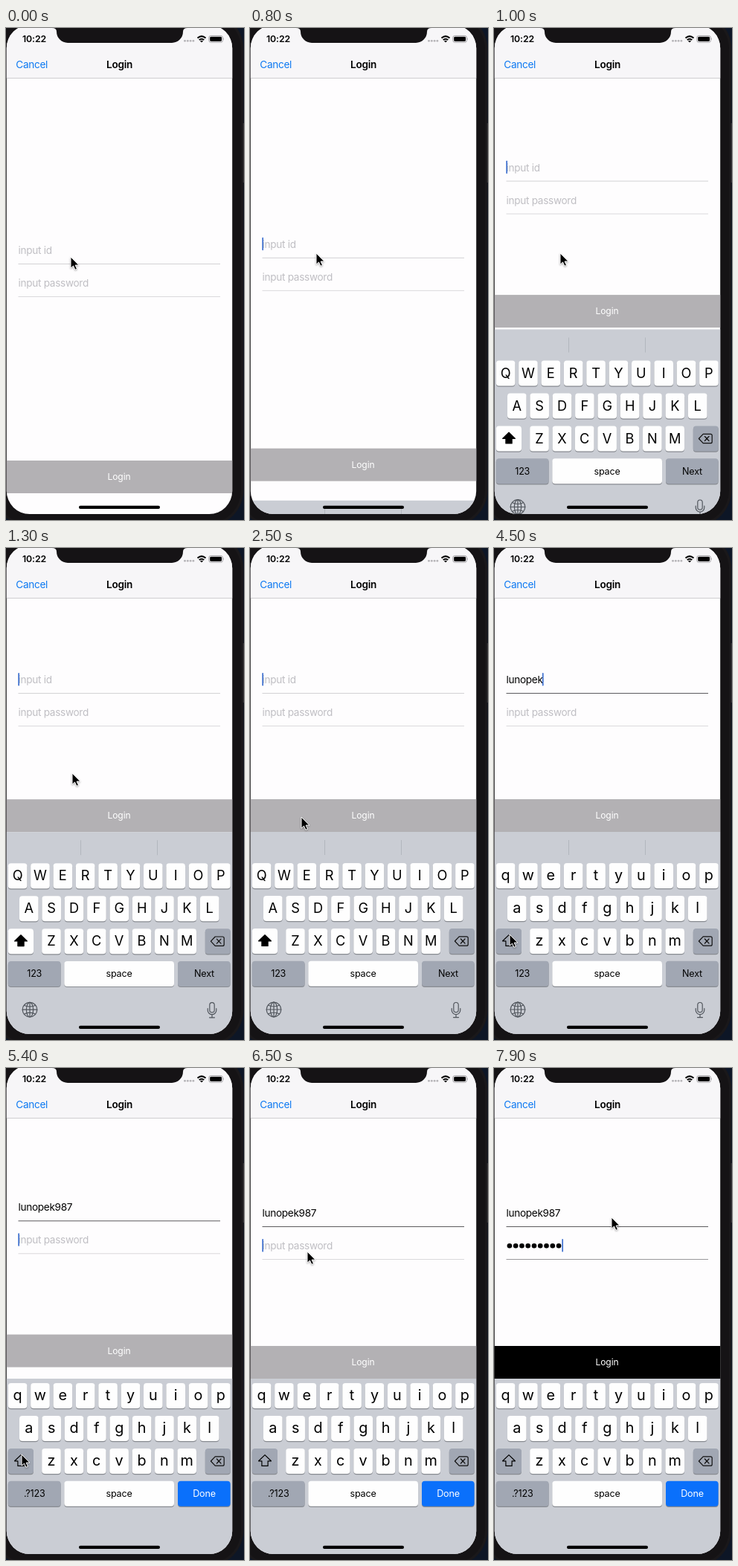
Write an HTML page that moves like this. It is 320 px wide and 662 px high and loops after 8 s.

```html
<!DOCTYPE html>
<html lang="en">
<head>
<meta charset="utf-8">
<title>Login form</title>
<style>
  html, body { margin: 0; width: 100%; height: 100%; overflow: hidden; background: #111; }
  svg { display: block; width: 320px; height: 662px; }
  text { font-family: Inter, Roboto, sans-serif; font-size: 13.6px; letter-spacing: -.3px; white-space: pre; }
  .mid { text-anchor: middle; }
  .key { letter-spacing: 0; text-anchor: middle; }
  .label { font-size: 12.6px; letter-spacing: -.2px; text-anchor: middle; }
  .hint { fill: #bfbec3; }
  .icon { fill: none; stroke: #50555c; stroke-width: 1.2; stroke-linecap: round; stroke-linejoin: round; }
</style>
</head>
<body>
<svg viewBox="0 0 320 662" xmlns="http://www.w3.org/2000/svg">
  <defs>
    <clipPath id="glass"><rect x=".8" y="-4" width="303.4" height="658" rx="31"/></clipPath>
  </defs>
  <rect width="320" height="662" fill="#0d1626"/>
  <rect x="-17" y="-20" width="336.4" height="690" rx="48" fill="#1a181a"/>
  <rect x="-14" y="-17" width="330" height="684" rx="45" fill="#151315"/>
  <rect x="318.6" y="128" width="2" height="80" fill="#343236"/>

  <g clip-path="url(#glass)">
    <rect width="320" height="662" fill="#fefdfe"/>

    <g id="fields">
      <text id="idHint" class="hint" x="16.5" y="5">input id</text>
      <text id="idText" x="16.5" y="5"></text>
      <rect id="idLine" x="16.5" y="18" width="271.5" height="1"/>
      <text id="pwHint" class="hint" x="16.5" y="49">input password</text>
      <g id="dots"></g>
      <rect id="pwLine" x="16.5" y="62" width="271.5" height="1"/>
      <rect id="caret" y="-9" width="1.7" height="17.5" rx=".8" fill="#3e70cf"/>
    </g>

    <g id="login">
      <rect id="loginBox" width="320" height="44"/>
      <text class="mid" x="152" y="26.3" fill="#fff" style="font-size:12.1px;letter-spacing:-.15px">Login</text>
    </g>

    <g id="board">
      <rect id="boardBg" width="320" fill="#cacdd4"/>
      <g id="bar">
        <path d="M100.5 393v20M203.5 393v20" stroke="#b2b6bd"/>
        <g class="icon">
          <circle cx="32" cy="621" r="9.8"/>
          <ellipse cx="32" cy="621" rx="4.6" ry="9.8"/>
          <path d="M32 611.2v19.6M22.2 621h19.6M24.3 615q7.7 4 15.4 0M24.3 627q7.7-4 15.4 0"/>
          <rect x="273.8" y="611.5" width="6.4" height="13.2" rx="3.2"/>
          <path d="M271.2 619.5v2.2a5.8 5.8 0 0 0 11.6 0v-2.2M277 627.6v4M273.5 631.6h7"/>
        </g>
      </g>
      <g id="keys"></g>
      <path id="arrow" d="M20 520.6l8.4 8.2h-4.3v6.6h-8.2v-6.6h-4.3z" stroke="#000" stroke-width="1.2" stroke-linejoin="round"/>
      <path class="icon" style="stroke:#111" d="M281.2 522.8h10a2 2 0 0 1 2 2v8.4a2 2 0 0 1-2 2h-10l-5.8-6.2zM283.4 526l5.6 6M289 526l-5.6 6"/>
    </g>

    <rect width="320" height="67" fill="#f7f6f8"/>
    <rect y="67" width="320" height="1" fill="#cfced1"/>
    <text x="13.3" y="54.3" fill="#0d79f2">Cancel</text>
    <text class="mid" x="152.5" y="54.3" font-weight="600">Login</text>
    <text x="22" y="19.3" font-weight="600" style="font-size:12.3px;letter-spacing:-.1px">10:22</text>
    <g fill="#b4b3b6">
      <circle cx="240.5" cy="17.3" r="1.4"/><circle cx="244.3" cy="17.3" r="1.4"/>
      <circle cx="248.1" cy="17.3" r="1.4"/><circle cx="251.9" cy="17.3" r="1.4"/>
    </g>
    <g fill="none" stroke="#000" stroke-width="2">
      <path d="M257.5 13.4q5.5-4.6 11 0M259.7 16q3.3-2.6 6.6 0"/>
    </g>
    <path d="M260.9 17.4q2.1-1.5 4.2 0l-2.1 2.1z"/>
    <rect x="272.8" y="10.4" width="18.6" height="8.9" rx="2.6" fill="none" stroke="#99989b" stroke-width=".9"/>
    <rect x="274.2" y="11.8" width="15.8" height="6.1" rx="1.4"/>
    <path d="M292.4 13.3q1.4 1.5 0 3z" fill="#99989b"/>
    <path d="M62-4h182v4q-6 0-6 5a15 15 0 0 1-15 15H83a15 15 0 0 1-15-15q0-5-6-5z" fill="#151315"/>
    <rect x="98" y="642.8" width="109" height="4.1" rx="2"/>
  </g>

  <path id="mouse" d="M0 0v15.2l3.5-3.2 2.4 5.3 2.6-1.1-2.4-5.1h4.8z" stroke="#fff" stroke-width="1" stroke-linejoin="round" style="filter:drop-shadow(0 1px 1px #0005)"/>
</svg>
<script>
const LOOP = 8000, ID_FOCUS = 778, LOWER = 3150, PW_FOCUS = 5296;
const USER = "lunopek987";
const idTimes = [3690, 3800, 3920, 4040, 4170, 4310, 4450, 4880, 4980, 5080];
const pwTimes = Array.from({ length: 9 }, (_, i) => 6690 + i * 100);
const mousePath = [
  [0, 87, 308], [100, 89, 303], [1850, 89, 303], [2300, 70, 357], [2400, 70, 357],
  [2500, 69, 362], [3050, 21, 520], [5600, 21, 520], [6480, 77, 247],
  [6700, 77, 247], [7700, 158, 201]
];

const $ = id => document.getElementById(id);
const set = (el, attrs) => { for (const k in attrs) el.setAttribute(k, attrs[k]); };
function add(parent, tag, attrs, text) {
  const el = document.createElementNS("http://www.w3.org/2000/svg", tag);
  set(el, attrs);
  if (text) el.textContent = text;
  parent.append(el);
  return el;
}

const GREY = "#a1a7b3", WHITE = "#fefefe";
function addKey(x, y, w, fill) {
  add($("keys"), "rect", { x, y: y + 1, width: w, height: 34.2, rx: 4, fill: "#888b91" });
  return add($("keys"), "rect", { x, y, width: w, height: 34, rx: 4, fill });
}

const letters = [];
[["qwertyuiop", 15.6], ["asdfghjkl", 30.8], ["zxcvbnm", 61]].forEach(([row, x0], r) => {
  [...row].forEach((ch, i) => {
    const x = x0 + i * 30.37, y = 424 + r * 44;
    addKey(x - 12.8, y, 25.6, WHITE);
    letters.push({ ch, el: add($("keys"), "text", { class: "key", x, y: y + 23.2 }) });
  });
});
const shiftKey = addKey(2.8, 512, 34.2, GREY);
addKey(267.8, 512, 34, GREY);
addKey(2.8, 555.7, 70.8, GREY);
addKey(78.3, 555.7, 147.7, WHITE);
const goKey = addKey(231, 555.7, 70.6, GREY);
const label = (x, text) => add($("keys"), "text", { class: "label", x, y: 577 }, text);
const modeText = label(38.2, "123");
const goText = label(266.5, "Next");
label(152, "space");

const dots = pwTimes.map((_, i) => add($("dots"), "circle", { cx: 20.9 + i * 8.27, cy: 44.3, r: 3.3 }));

const settle = ms => ms <= 0 ? 0 : 1 - Math.exp(-ms * .01826) * (1 + ms * .01826);
const show = (el, on) => { el.style.display = on ? "" : "none"; };
const count = (times, t) => times.filter(v => v <= t).length;

function mouseAt(t) {
  let i = mousePath.findIndex(p => p[0] > t);
  if (i < 0) return mousePath[mousePath.length - 1].slice(1);
  const a = mousePath[i - 1], b = mousePath[i];
  const u = (t - a[0]) / (b[0] - a[0]), s = u * u * (3 - 2 * u);
  return [a[1] + (b[1] - a[1]) * s, a[2] + (b[2] - a[2]) * s];
}

function caretAlpha(t, pw, typed, times) {
  if (t < ID_FOCUS) return 0;
  const since = typed ? times[typed - 1] : pw ? PW_FOCUS : ID_FOCUS;
  const p = (t - since) % 850;
  if (p < 550) return 1;
  return Math.max(0, 1 - (p - 550) / 80, (p - 790) / 60);
}

function draw(t) {
  const rise = settle(t - ID_FOCUS), drop = settle(t - PW_FOCUS);
  const pw = t >= PW_FOCUS, upper = t < LOWER;
  const nId = count(idTimes, t), nPw = count(pwTimes, t);
  const top = 582 - 244 * rise + 36 * drop;

  set($("login"), { transform: `translate(0 ${top})` });
  set($("loginBox"), { fill: nId && nPw ? "#000" : "#b3b1b4" });
  set($("fields"), { transform: `translate(0 ${top / 2 + 8})` });

  $("idText").textContent = USER.slice(0, nId);
  show($("idHint"), !nId);
  show($("pwHint"), !nPw);
  set($("idLine"), { fill: nId ? "#5c5b5e" : "#d2d1d4" });
  set($("pwLine"), { fill: nPw ? "#99989b" : "#dad9dc" });
  dots.forEach((d, i) => show(d, i < nPw));

  const idEnd = nId ? $("idText").getComputedTextLength() - .5 : 0;
  set($("caret"), {
    x: 16.3 + (pw ? nPw * 8.27 + (nPw ? .6 : 0) : idEnd),
    y: pw ? 35 : -9,
    opacity: caretAlpha(t, pw, pw ? nPw : nId, pw ? pwTimes : idTimes)
  });

  show($("board"), rise > 0);
  set($("board"), { transform: `translate(0 ${272 * (1 - rise)})` });
  set($("boardBg"), { y: pw ? 418 : 382, height: 290 });
  show($("bar"), !pw);
  letters.forEach(({ ch, el }) => {
    el.textContent = upper ? ch.toUpperCase() : ch;
    el.style.fontSize = upper ? "18.2px" : "19.8px";
  });
  set(shiftKey, { fill: upper ? WHITE : GREY });
  set($("arrow"), { fill: upper ? "#000" : "none" });
  modeText.textContent = pw ? ".?123" : "123";
  goText.textContent = pw ? "Done" : "Next";
  set(goKey, { fill: pw ? "#0a70fb" : GREY });
  set(goText, { fill: pw ? "#fff" : "#000" });

  set($("mouse"), { transform: `translate(${mouseAt(t)})` });
}

function tick() {
  draw(performance.now() % LOOP);
  requestAnimationFrame(tick);
}
tick();
</script>
</body>
</html>
```
